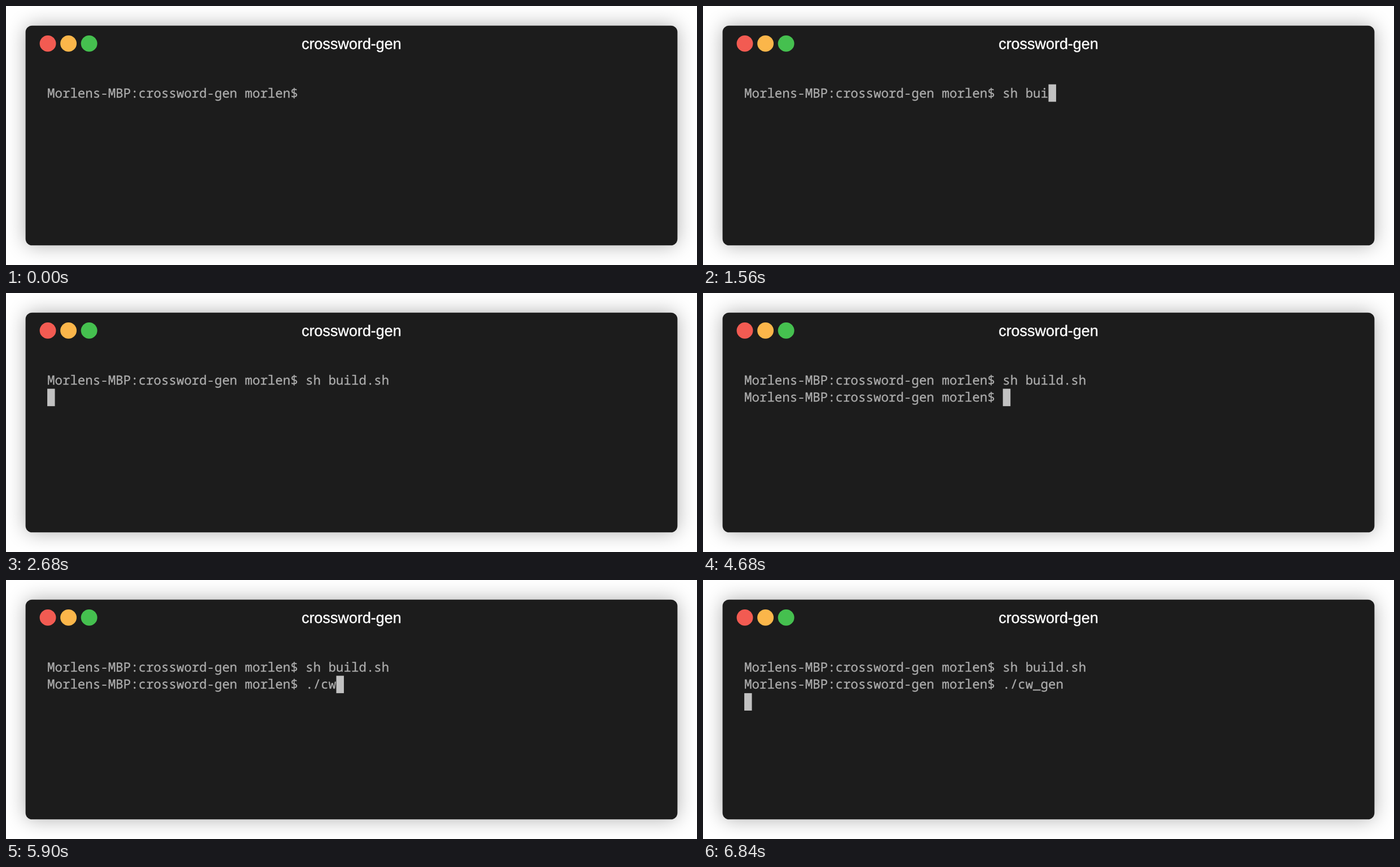
These frames come from a looping animation (1223x458 px, 8 s). An HTML page:

```html
<!DOCTYPE html>
<html lang="en">
<head>
<meta charset="utf-8">
<title>crossword-gen</title>
<style>
html, body { margin: 0; width: 100%; height: 100%; overflow: hidden; background: #fff; }
#shadow { position: absolute; left: 35px; top: 35px; width: 1153px; height: 388px;
  border-radius: 12px; box-shadow: 0 0 35px rgba(0, 0, 0, .32); }
svg { position: absolute; left: 0; top: 0; }
text { text-rendering: geometricPrecision; white-space: pre; }
#title { font: 14px "Liberation Sans", Arial, sans-serif; text-anchor: middle;
  fill: #fff; stroke: #fff; stroke-width: .2; }
.row { font: 11.667px "Noto Sans Mono", monospace;
  fill: #acacac; stroke: #acacac; stroke-width: .15; }
</style>
</head>
<body>
<div id="shadow"></div>
<svg width="1223" height="458" viewBox="0 0 636 238" preserveAspectRatio="none">
  <rect x="18" y="18" width="600" height="202" rx="6" fill="#1c1c1c"/>
  <circle cx="38.5" cy="34.5" r="7.5" fill="#f25b52"/>
  <circle cx="57.5" cy="34.5" r="7.5" fill="#fbb64a"/>
  <circle cx="76.5" cy="34.5" r="7.5" fill="#45c04f"/>
  <text id="title" x="318" y="39.5">crossword-gen</text>
  <text class="row" x="38" y="84"></text>
  <text class="row" x="38" y="100"></text>
  <rect id="cursor" width="7" height="16" fill="#c1c1c1"/>
</svg>
<script>
const LOOP = 8000, LEFT = 38, TOP = 72, CELL = 7, LINE = 16;
const PROMPT = "Morlens-MBP:crossword-gen morlen$ ";
// start: when the prompt appears; keys: time of each keystroke, the last being Enter
const commands = [
  { text: "sh build.sh", start: 0,
    keys: [800, 950, 1070, 1240, 1390, 1560, 1780, 1910, 2060, 2180, 2350, 2680] },
  { text: "./cw_gen", start: 4680,
    keys: [5440, 5590, 5710, 5900, 6170, 6340, 6390, 6540, 6840] }
];
const rows = document.querySelectorAll(".row");
const cursor = document.getElementById("cursor");

function draw(t) {
  let line = 0, col = 0;
  commands.forEach(({ text, start, keys }, i) => {
    const typed = keys.filter(k => k <= t).length;
    const shown = t < start ? "" : PROMPT + text.slice(0, typed);
    rows[i].textContent = shown;
    if (t < start) return;
    const entered = typed === keys.length;
    line = entered ? i + 1 : i;
    col = entered ? 0 : shown.length;
  });
  cursor.setAttribute("x", LEFT + col * CELL);
  cursor.setAttribute("y", TOP + line * LINE);
  cursor.style.visibility = t < commands[0].keys[0] ? "hidden" : "visible";
}

const begin = performance.now();
function tick() {
  draw((performance.now() - begin) % LOOP);
  requestAnimationFrame(tick);
}
tick();
</script>
</body>
</html>
```
